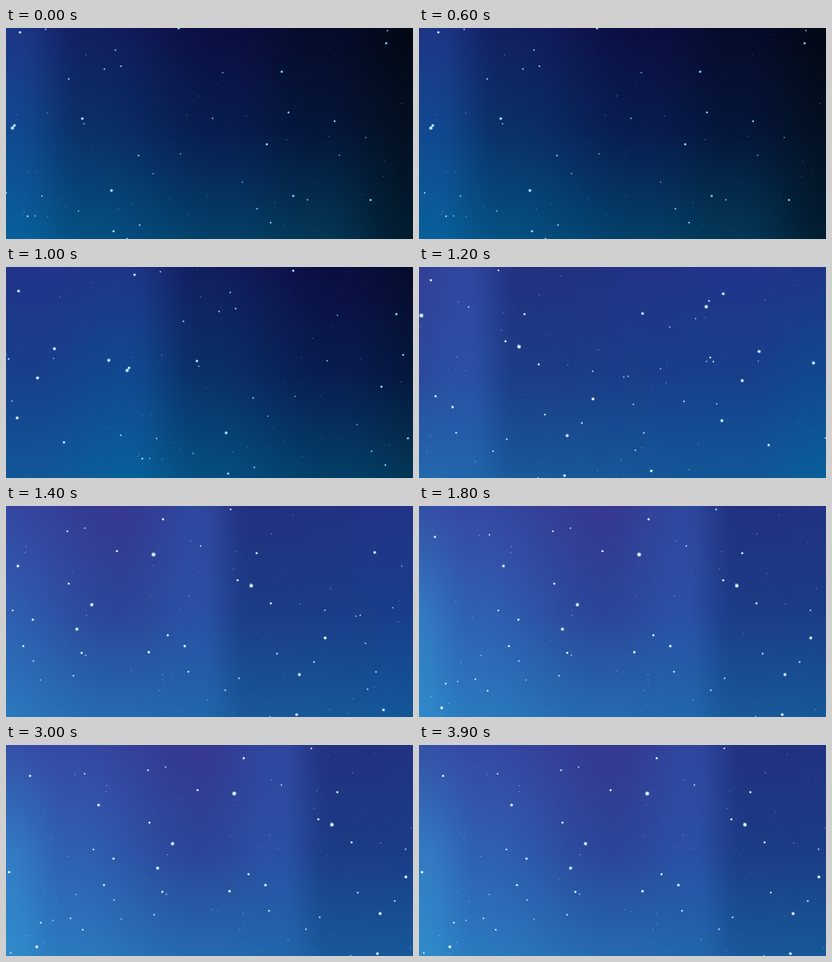
An HTML page with a canvas that plays this animation: 600x311 px, repeating every 4 s.

```html
<!DOCTYPE html>
<html lang="en">
<head>
<meta charset="utf-8">
<title>Night sky pan</title>
<style>
html, body { margin: 0; width: 100%; height: 100%; overflow: hidden; background: #0b1a4a; }
canvas { display: block; width: 600px; height: 311px; }
</style>
</head>
<body>
<canvas id="stage" width="600" height="311"></canvas>
<script>
const W = 600, H = 311, PAN = 932, RISE = 9, LOOP = 4000, STEP = 100;
const SKY_W = W + PAN, SKY_H = H + RISE;

// Key columns of the sky: x, then top, middle and bottom colour
const columns = [
  [0, 0x3450a6, 0x337bc4, 0x2f8cca],
  [90, 0x3548a2, 0x2f60b2, 0x2a7bbe],
  [285, 0x35388f, 0x2b4698, 0x246cb0],
  [400, 0x30479e, 0x2a50a4, 0x2068ac],
  [480, 0x22317f, 0x1b3c86, 0x185a9a],
  [800, 0x22348a, 0x173f8a, 0x115898],
  [940, 0x1e3585, 0x11488f, 0x08609a],
  [1050, 0x121d60, 0x0a3068, 0x045082],
  [1250, 0x0b0d40, 0x081c4e, 0x034068],
  [1390, 0x060a2a, 0x04163a, 0x033756],
  [SKY_W, 0x030714, 0x031022, 0x021c30]
];

// Landmark stars as x,y pairs, brightest first
const bright = [
  336,71, 480,117, 756,58, 941,156, 245,145, 914,141, 809,167, 223,181,
  834,124, 551,248, 779,226, 1087,248, 45,297, 589,194, 781,39, 547,307,
  136,88, 662,68, 675,300, 944,152, 1044,142, 329,215, 382,206, 4,187,
  848,262, 952,15, 1186,9, 1338,73, 1316,180, 1355,256, 1090,308, 1469,262,
  1492,31, 350,19, 35,45, 158,167, 357,190, 230,216, 460,109, 282,66,
  211,114, 488,69, 144,206, 509,143, 1348,133, 1416,146
];

const lerp = (a, b, k) => a + (b - a) * k;
const clamp = k => Math.min(1, Math.max(0, k));

function mix(a, b, k) {
  const part = s => Math.round(lerp(a >> s & 255, b >> s & 255, k));
  return `rgb(${part(16)},${part(8)},${part(0)})`;
}

function random(seed) {
  return () => (seed = (seed * 16807) % 2147483647) / 2147483647;
}

function paintSky(g) {
  for (let x = 0; x < SKY_W; x += 2) {
    const i = columns.findIndex(c => c[0] > x);
    const [x0, ...a] = columns[i - 1], [x1, ...b] = columns[i];
    const k = (x - x0) / (x1 - x0);
    const fill = g.createLinearGradient(0, 0, 0, SKY_H);
    a.forEach((c, n) => fill.addColorStop(n / 2, mix(c, b[n], k * k * (3 - 2 * k))));
    g.fillStyle = fill;
    g.fillRect(x, 0, 2, SKY_H);
  }
}

function star(g, x, y, r, alpha) {
  const far = clamp((x - 700) / 600);
  const core = mix(0xffffff, 0x9cdcff, far);
  const halo = mix(0xa8dcff, 0x3f9fe8, far);
  const disc = (radius, color, a) => {
    g.globalAlpha = a;
    g.fillStyle = color;
    g.beginPath();
    g.arc(x + 0.5, y + 0.5, radius, 0, Math.PI * 2);
    g.fill();
  };
  if (r > 0.8) {
    disc(r * 1.7, halo, alpha * 0.25);
    disc(r * 1.3, halo, alpha * 0.5);
  }
  disc(r, core, alpha);
  g.globalAlpha = 1;
}

function paintStars(g) {
  const rnd = random(4711);
  for (let n = 0; n < 380; n++) {
    const x = rnd() * SKY_W, y = rnd() * SKY_H, size = rnd() ** 3;
    star(g, x, y, lerp(0.5, 1.1, size), lerp(0.25, 0.9, size));
  }
  for (let n = 0; n < bright.length; n += 2) {
    star(g, bright[n], bright[n + 1], lerp(2.2, 1.15, Math.sqrt(n / bright.length)), 0.95);
  }
}

const sky = document.createElement('canvas');
sky.width = SKY_W;
sky.height = SKY_H;
const skyCtx = sky.getContext('2d');
paintSky(skyCtx);
paintStars(skyCtx);

// The pan creeps in, then follows a double-exponential S-curve through these times and positions
const START = 900;
const keys = [[START, 42], [1000, 169], [1200, 599], [1800, 920], [3000, 931.7]];
const bend = x => -Math.log(-Math.log(x / PAN));
const unbend = u => PAN * Math.exp(-Math.exp(-u));

function pan(t) {
  if (t < START) return keys[0][1] * (t / START) ** 4;
  const i = Math.max(1, keys.findIndex(k => k[0] >= t));
  const [[t0, x0], [t1, x1]] = t > 3000 ? keys.slice(-2) : keys.slice(i - 1);
  return unbend(lerp(bend(x0), bend(x1), (t - t0) / (t1 - t0)));
}

const rise = t => RISE * clamp((t - START) / 180);

const ctx = document.getElementById('stage').getContext('2d');
const start = performance.now();

function draw(now) {
  const t = Math.floor((Math.max(0, now - start) % LOOP) / STEP) * STEP;
  ctx.drawImage(sky, Math.round(pan(t)) - PAN, Math.round(rise(t)) - RISE);
  requestAnimationFrame(draw);
}
draw(start);
</script>
</body>
</html>
```
